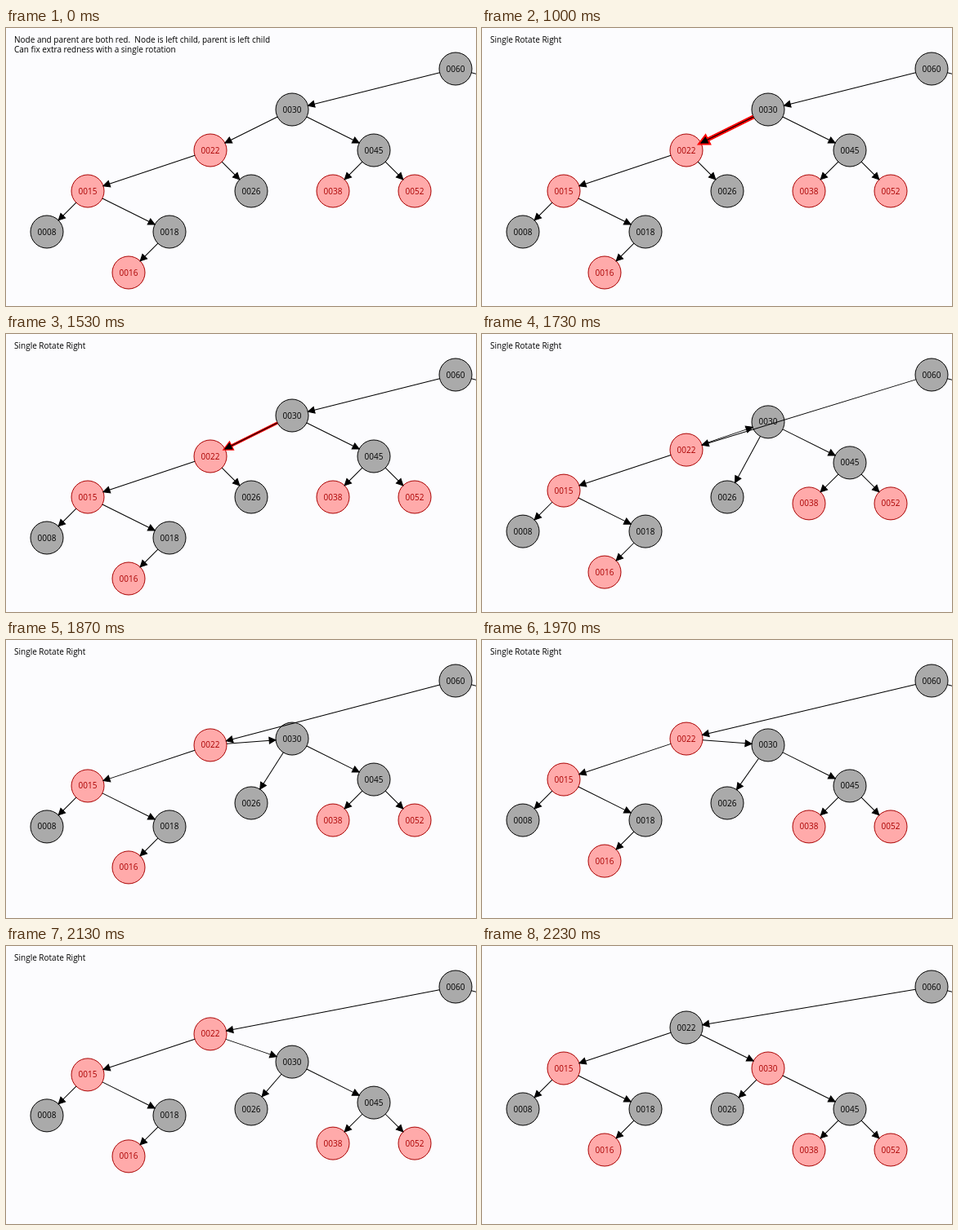
Recreate the animation shown at these times as an HTML page with a canvas. Size 575 px wide and 341 px high, loop 3.23 s.

```html
<!DOCTYPE html>
<html lang="en">
<head>
<meta charset="utf-8">
<title>Red-black tree: single rotation</title>
<style>
  html, body { margin: 0; width: 100%; height: 100%; overflow: hidden; background: #fcfcfe; }
  canvas { display: block; }
</style>
</head>
<body>
<canvas id="stage" width="575" height="341"></canvas>
<script>
const ctx = document.getElementById('stage').getContext('2d');
const LOOP = 3230, RADIUS = 20, SHIFT = 50;
const ROTATE = 19, DONE = 37, MOVES = 19; // first two in ticks after the first second

// key: [x, y, vertical direction during the rotation]
const nodes = {
  60: [550, 50, 0], 30: [350, 100, 1], 22: [250, 150, -1], 45: [450, 150, 1],
  15: [100, 200, -1], 26: [300, 200, 0], 38: [400, 200, 1], 52: [500, 200, 1],
  8: [50, 250, -1], 18: [200, 250, -1], 16: [150, 300, -1]
};
const shared = [[30, 45], [22, 15], [15, 8], [15, 18], [18, 16], [45, 38], [45, 52]];
const before = [...shared, [60, 30], [30, 22], [22, 26]];
const after = [...shared, [60, 22], [22, 30], [30, 26]];
const message = [
  'Node and parent are both red.  Node is left child, parent is left child',
  'Can fix extra redness with a single rotation'
];

const clamp = v => Math.min(1, Math.max(0, v));

function drawNode(key, [x, y], red) {
  const ink = red ? '#aa0000' : '#000000';
  ctx.lineWidth = 1;
  ctx.strokeStyle = ink;
  ctx.fillStyle = red ? '#ffaaaa' : '#aaaaaa';
  ctx.beginPath();
  ctx.arc(x, y, RADIUS, 0, 2 * Math.PI);
  ctx.fill();
  ctx.stroke();
  ctx.fillStyle = ink;
  ctx.textAlign = 'center';
  ctx.fillText(key.padStart(4, '0'), x, y + 3.5);
}

function drawArrow([x1, y1], [x2, y2], width = 1, color = '#000000') {
  const length = Math.hypot(x2 - x1, y2 - y1);
  ctx.save();
  ctx.translate(x1, y1);
  ctx.rotate(Math.atan2(y2 - y1, x2 - x1));
  ctx.lineWidth = width;
  ctx.strokeStyle = ctx.fillStyle = color;
  const tip = length - RADIUS;
  ctx.beginPath();
  ctx.moveTo(RADIUS, 0);
  ctx.lineTo(tip, 0);
  ctx.stroke();
  ctx.beginPath();
  ctx.moveTo(tip, 0);
  ctx.lineTo(tip - 8, -4);
  ctx.lineTo(tip - 8, 4);
  ctx.closePath();
  ctx.stroke();
  ctx.fill();
  ctx.restore();
}

function drawText(lines) {
  ctx.fillStyle = '#000000';
  ctx.textAlign = 'left';
  lines.forEach((line, i) => ctx.fillText(line, 10, 18 + 12 * i));
}

function draw(time) {
  const started = time >= 1000;
  const tick = started ? Math.min(DONE, Math.floor((time - 996) * 0.03)) : 0;
  const rotating = tick >= ROTATE, done = tick === DONE;
  // The motion gains one extra step about halfway through.
  const step = rotating ? Math.round(tick - ROTATE + clamp((tick - 22) / 7)) : 0;
  const offset = SHIFT * step / MOVES;

  const at = {};
  for (const key in nodes) {
    const [x, y, dir] = nodes[key];
    at[key] = [x, y + dir * offset];
  }
  const reds = [15, 16, 38, 52, done ? 30 : 22];

  ctx.fillStyle = '#fcfcfe';
  ctx.fillRect(0, 0, 575, 341);
  ctx.font = '10px "Open Sans", "Noto Sans", sans-serif';
  if (!started) drawText(message);
  else if (!done) drawText(['Single Rotate Right']);

  for (const key in at) drawNode(key, at[key], reds.includes(+key));
  if (started && !rotating) drawArrow(at[30], at[22], 5 - 2 * tick / ROTATE, '#ff0000');
  for (const [from, to] of rotating ? after : before) drawArrow(at[from], at[to]);
  drawArrow(at[60], [750, 100]);
}

const origin = performance.now();
function frame() {
  draw((performance.now() - origin) % LOOP);
  requestAnimationFrame(frame);
}
frame();
</script>
</body>
</html>
```
